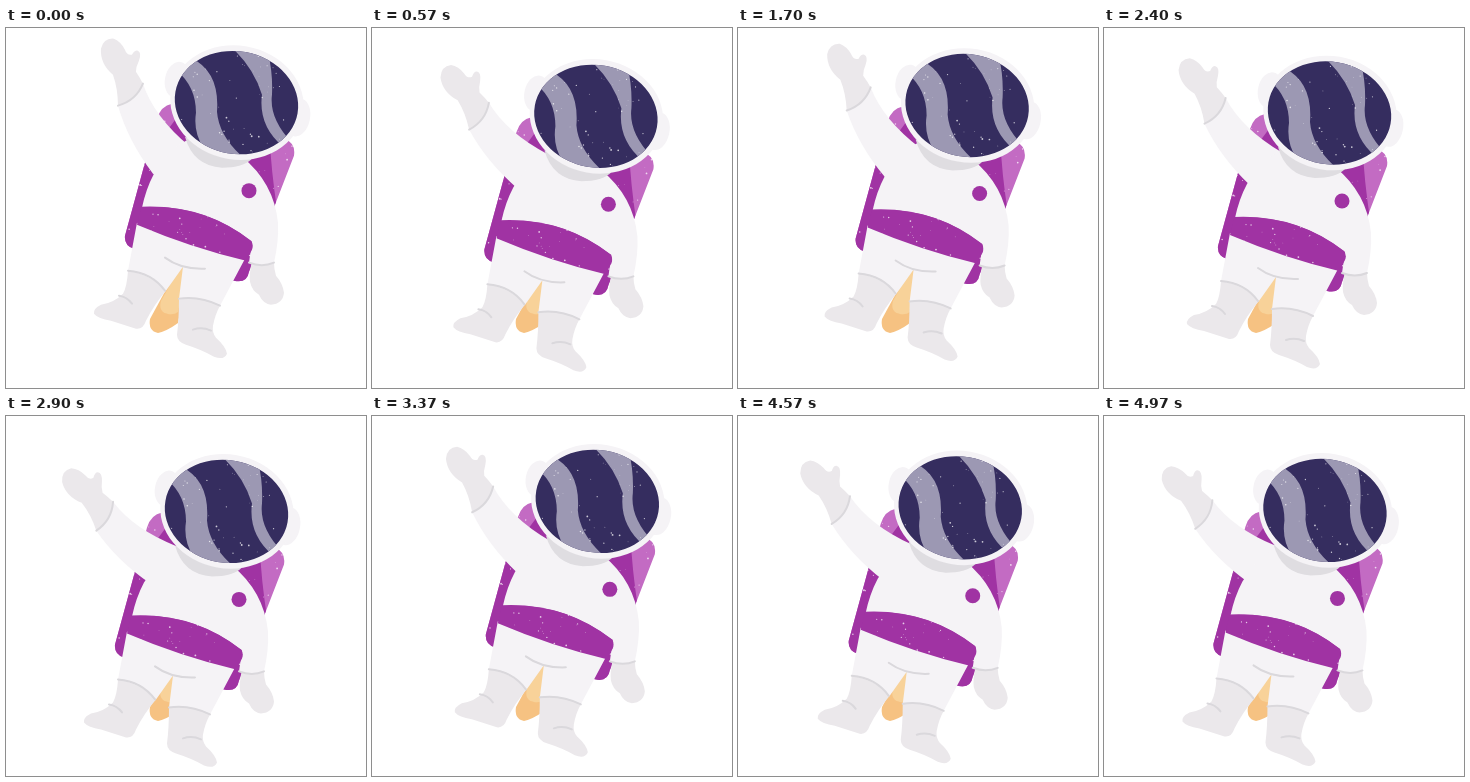
Write an HTML page that moves like this. It is 360 px wide and 360 px high and loops after 5.07 s.

```html
<!DOCTYPE html>
<html lang="en">
<head>
<meta charset="utf-8">
<title>Waving astronaut</title>
<style>
  html, body { margin: 0; height: 100%; overflow: hidden; background: #fff; }
  svg { display: block; width: 100%; height: 100%; }
  .suit { fill: #f5f3f6; }
  .limb { fill: #ebe8eb; }
  .dark { fill: #a033a3; }
  .light { fill: #c36bc3; }
  .seam { fill: none; stroke: #dad8dc; stroke-width: 2; stroke-linecap: round; }
  .specks { fill: #fff; opacity: .75; }
</style>
</head>
<body>
<svg viewBox="0 0 360 360">
  <defs>
    <clipPath id="visor"><ellipse cx="230.5" cy="74" rx="62" ry="51.3" transform="rotate(10 230.5 74)"/></clipPath>
    <clipPath id="belt"><path d="M135 178Q197 175 245 212Q248 216 246 221L240 232Q185 219 131 196Z"/></clipPath>
    <clipPath id="pack"><path d="M166 75L278 110Q290 114 288 127L243 243Q241 255 228 252L128 220Q118 217 119 207L151 90Q155 77 166 75Z"/></clipPath>
  </defs>

  <g id="flame">
    <path fill="#f6c282" d="M176 232L144 291Q142 303 152 305Q161 303 172 295L182 240Z"/>
    <path fill="#f8d299" d="M178 232L155 273Q152 284 162 286Q168 287 172 284L180 240Z"/>
  </g>

  <g id="body">
    <g clip-path="url(#pack)">
      <path class="light" d="M140 60H300V260H110Z"/>
      <path class="dark" d="M170 90L188 116L250 126L264 112Q265 140 271 180L250 260H110V180L146 122Z"/>
      <g class="specks" data-box="120 75 168 175" data-count="130"></g>
    </g>

    <g id="arm">
      <path class="suit" d="M112 77Q122 112 147 145L180 160L184 118Q148 88 137 55Z"/>
      <path class="limb" d="M112 77Q112 60 107 46Q94 35 95 20Q98 9 108 10Q115 13 119 21Q121 27 126 26Q129 21 132 22Q136 24 133 32Q130 38 130 43Q134 49 137 55Q129 72 112 77Z"/>
      <path class="seam" d="M112 77Q130 72 137 55"/>
    </g>

    <path class="limb" d="M122 242Q121 258 117 265Q108 274 95 276Q87 280 88 285Q92 290 105 292L130 300Q137 301 140 292Q148 276 160 262Q146 246 122 242Z"/>
    <path class="limb" d="M173 270Q173 290 171 306Q171 313 180 316Q196 321 208 328Q218 332 221 325Q220 318 210 309Q206 304 207 297Q209 286 214 277Q194 267 173 270Z"/>
    <path class="seam" d="M113 267Q121 268 126 275M187 301Q196 298 205 302"/>
    <path class="suit" d="M131 194L122 242Q146 246 160 262L177 238L173 270Q194 267 214 277L239 230Z"/>
    <path class="seam" d="M122 242Q146 244 159 262M173 270Q194 267 214 277M159 229Q175 241 199 240"/>

    <path class="limb" d="M246 232Q243 246 244 253Q246 262 253 266Q257 275 265 276Q277 275 278 264Q277 255 270 247Q268 240 268 234Z"/>
    <path class="suit" d="M180 112Q162 122 148 145Q140 160 136 179Q196 174 246 213L243 234Q256 239 268 234Q273 212 272 194Q268 154 236 128Z"/>
    <path class="seam" d="M243 234Q256 239 268 234"/>

    <g clip-path="url(#belt)">
      <path class="dark" d="M120 165H255V240H120Z"/>
      <g class="specks" data-box="130 176 117 56" data-count="45"></g>
    </g>
    <circle class="dark" cx="243" cy="162" r="7.5"/>

    <path fill="#dfdde1" d="M179 108Q187 137 216 139Q237 139 246 130Z"/>
    <g class="suit">
      <ellipse cx="171" cy="51" rx="12" ry="18" transform="rotate(12 171 51)"/>
      <ellipse cx="292" cy="89" rx="12" ry="19" transform="rotate(12 292 89)"/>
      <ellipse cx="231" cy="74" rx="67" ry="57" transform="rotate(10 231 74)"/>
    </g>
    <g clip-path="url(#visor)">
      <path fill="#352d5f" d="M160 10H300V140H160Z"/>
      <g fill="#9c98b3">
        <path d="M171 42Q190 58 190 84Q187 104 198 120L241 132Q213 109 211 83Q214 43 185 29Z"/>
        <path d="M227 20Q248 40 256 66Q252 97 277 118L286 114Q263 90 266 66Q267 44 262 24Z"/>
      </g>
      <g class="specks" data-box="169 22 123 104" data-count="60"></g>
    </g>
  </g>
</svg>

<script>
  const LOOP = 5070, STEP = 80, STEPS = 63, PERIOD = 1940;
  const body = document.getElementById('body');
  const arm = document.getElementById('arm');

  let seed = 11;
  const random = () => (seed = seed * 16807 % 2147483647) / 2147483647;

  for (const group of document.querySelectorAll('.specks')) {
    const [x, y, w, h] = group.dataset.box.split(' ').map(Number);
    for (let i = 0; i < group.dataset.count; i++) {
      const dot = document.createElementNS('http://www.w3.org/2000/svg', 'circle');
      dot.setAttribute('cx', x + random() * w);
      dot.setAttribute('cy', y + random() * h);
      dot.setAttribute('r', .3 + random() ** 2 * .7);
      group.append(dot);
    }
  }

  // The suit drifts along a slanted line while the arm swings with it.
  function draw(now) {
    const t = Math.min(Math.floor(now % LOOP / STEP), STEPS - 1) * STEP;
    const drop = (1 - Math.cos(2 * Math.PI * (t + 25) / PERIOD)) / 2;
    body.setAttribute('transform', `translate(${-10 * drop} ${.6 + 20.8 * drop})`);
    arm.setAttribute('transform', `rotate(${-18.5 * drop} 156 121)`);
  }

  const start = performance.now();
  function tick() {
    draw(performance.now() - start);
    requestAnimationFrame(tick);
  }
  tick();
</script>
</body>
</html>
```
